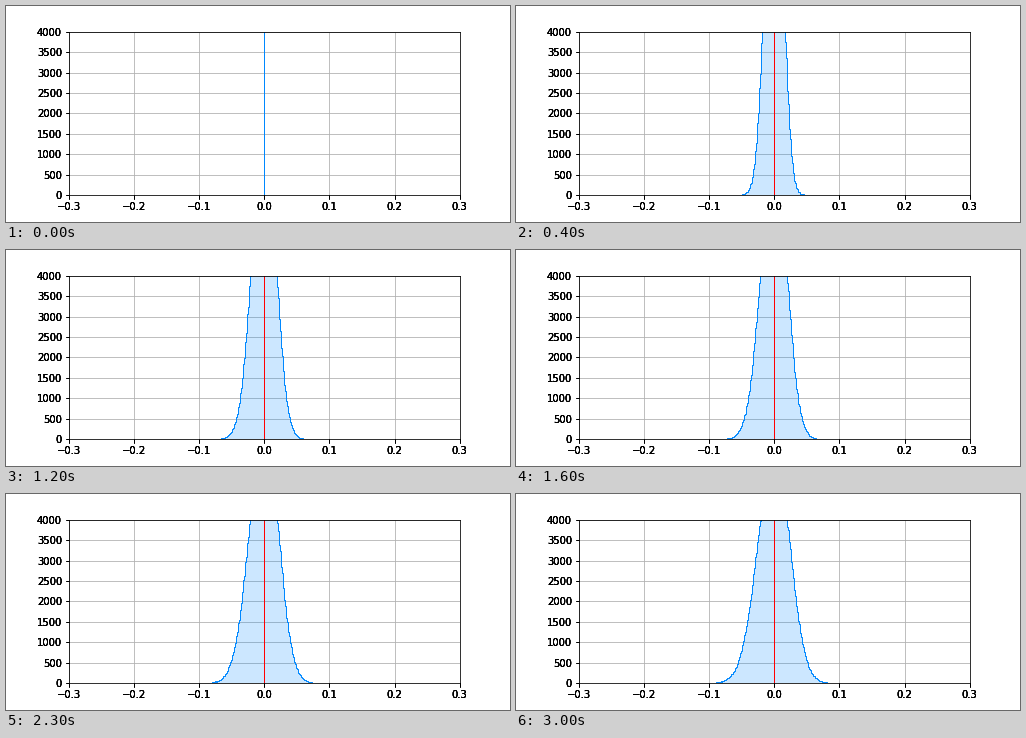
Write a matplotlib script that moves like this. It is 504 by 216 pixels and loops after 3600 ms.

```python
import numpy as np
import matplotlib.pyplot as plt
from matplotlib.animation import FuncAnimation

FRAMES, STEP_MS, LAST = 36, 100, 30
BLUE, RED = "#0088ff", "#ff0000"
AREA = 346
EDGES = np.linspace(-0.12, 0.12, 241)
MIDS = (EDGES[:-1] + EDGES[1:]) / 2
SPIKE = np.array([[-0.3, 0], [0, 0], [0, 9000], [0, 0], [0.3, 0]])

plt.rcParams.update({"font.family": "DejaVu Sans", "font.size": 10})
fig = plt.figure(figsize=(7, 3), dpi=72, facecolor="white")
BOX = [0.125, 0.125, 0.775, 0.755]


def add_axes(**kw):
    ax = fig.add_axes(BOX, **kw)
    ax.set_xlim(-0.3, 0.3)
    ax.set_ylim(0, 4000)
    ax.set_yticks(range(0, 4001, 500))
    return ax


ax = add_axes()
ax.grid(True)
# Stacked copies of the ticks give the heavy look of the labels.
for _ in range(3):
    add_axes(frameon=False)

area, = ax.fill(*SPIKE.T, color=BLUE, alpha=0.2, lw=0, zorder=2.1)
ax.plot(*SPIKE.T, color=RED, lw=1, zorder=2.2)
outline, = ax.plot(*SPIKE.T, color=BLUE, lw=1, zorder=2.3)


def histogram(step):
    """Outline of the bell that spreads out from a spike at zero."""
    if step == 0:
        return SPIKE
    sigma = 0.0059 + 0.0033 * np.sqrt(step)
    side = np.where(MIDS < 0, 1.06, 0.96) * sigma
    counts = AREA / (sigma * np.sqrt(2 * np.pi)) * np.exp(-(MIDS / side) ** 2 / 2)
    noise = np.random.default_rng(step).normal(size=counts.size)
    counts = np.maximum(counts + 0.4 * np.sqrt(counts) * noise, 0).round()
    x = np.concatenate([[-0.3], np.repeat(EDGES, 2), [0.3]])
    y = np.concatenate([[0, 0], np.repeat(counts, 2), [0, 0]])
    return np.column_stack([x, y])


def draw(i):
    points = histogram(min(i, LAST))
    area.set_xy(points)
    outline.set_data(*points.T)
    return area, outline


anim = FuncAnimation(fig, draw, frames=FRAMES, interval=STEP_MS,
                     repeat=True, repeat_delay=0)
plt.show()
```
